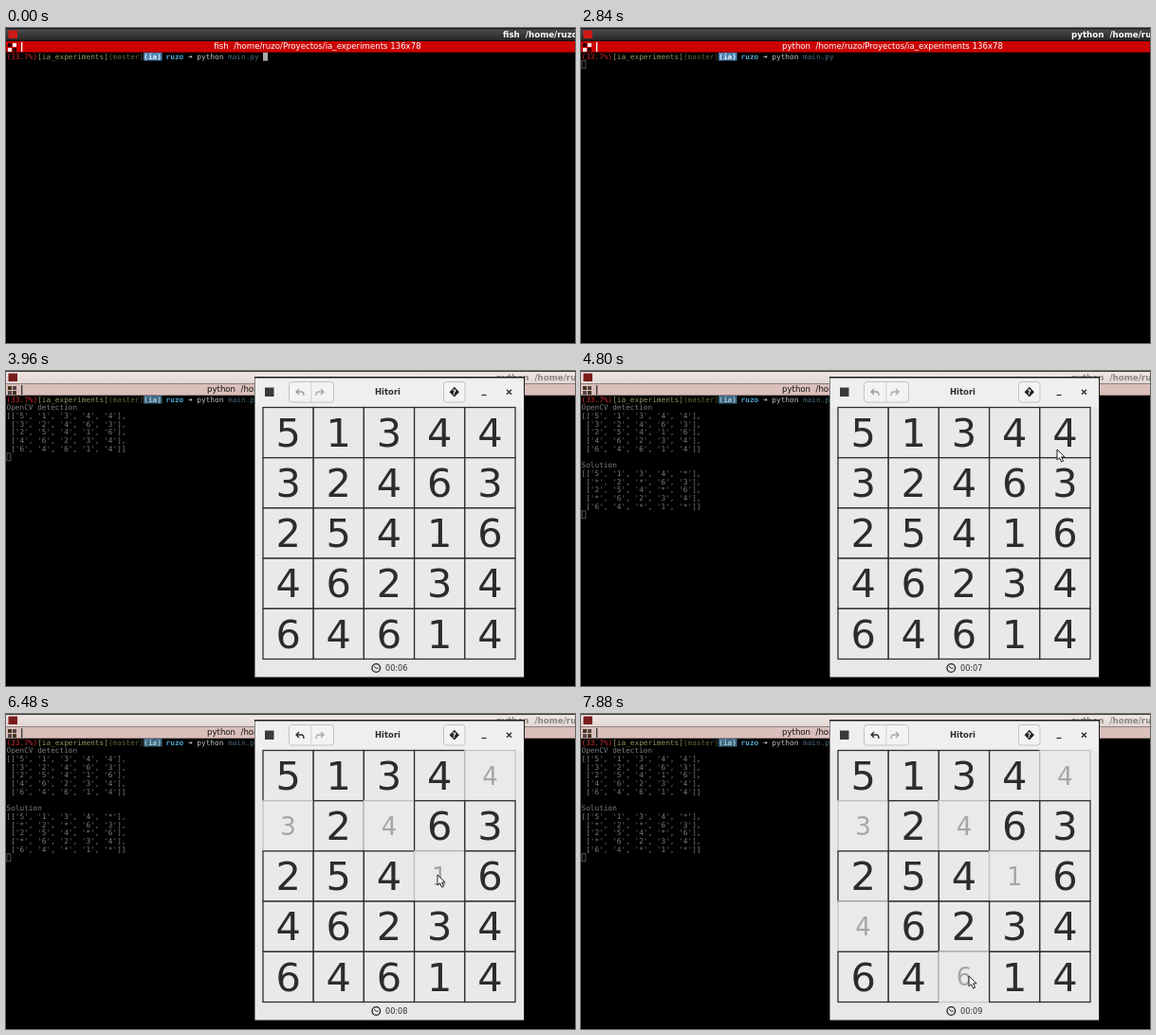
Recreate the animation shown at these times as an HTML page. Size 600 px wide and 333 px high, loop 8000 ms.

```html
<!DOCTYPE html>
<html>
<head>
<meta charset="utf-8">
<style>
html, body { margin: 0; height: 100%; overflow: hidden; background: #000; }
svg { display: block; width: 100vw; height: 100vh; }
text { white-space: pre; font-family: "DejaVu Sans", sans-serif; }
.mono { font-family: "DejaVu Sans Mono", monospace; font-size: 7.76px; }
</style>
</head>
<body>
<svg id="stage" viewBox="0 0 600 333">
  <defs>
    <linearGradient id="dark" x2="0" y2="1">
      <stop offset="0" stop-color="#1c1c1c"/><stop offset=".15" stop-color="#4a4a4a"/><stop offset="1" stop-color="#222"/>
    </linearGradient>
    <linearGradient id="light" x2="0" y2="1">
      <stop offset="0" stop-color="#f1e9e6"/><stop offset="1" stop-color="#e0d5d1"/>
    </linearGradient>
  </defs>
  <g id="scene"></g>
</svg>
<script>
const LOOP = 8000, STEP = 280;
const RUN = 2840, OPEN = 3120, DETECTED = 3960, SOLVED = 4520, MOUSE = 4800;
const COL = 4.67, LINE = 8.7, CELL = 53.2, GX = 271, GY = 38.5;
const GRID = ['51344', '32463', '25416', '46234', '64614'];
const SOLUTION = ['5134*', '*2*63', '254*6', '*6234', '64*1*'];
// row + column of each crossed-out cell, and when it is clicked
const CLICKS = { '04': 5080, '10': 6200, '12': 6480, '23': 6480, '30': 7600, '42': 7880 };
const PATH = [[502, 83], [474, 72], [449, 80], [353, 104], [301, 117], [394, 118],
  [455, 170], [420, 185], [330, 215], [300, 225], [352, 252], [409, 277]];

const scene = document.getElementById('scene');

const rect = (x, y, w, h, fill, more = '') =>
  `<rect x="${x}" y="${y}" width="${w}" height="${h}" fill="${fill}" ${more}/>`;
const text = (x, y, s, fill, size, more = '') =>
  `<text x="${x}" y="${y}" fill="${fill}" font-size="${size}" ${more}>${s}</text>`;
const path = (d, stroke, width = 1, fill = 'none') =>
  `<path d="${d}" fill="${fill}" stroke="${stroke}" stroke-width="${width}"/>`;
const mid = 'text-anchor="middle" ';
const bold = 'font-weight="bold"';

const mono = (col, row, s, fill, more = '') =>
  text(0.5 + col * COL, 32.5 + row * LINE, s, fill, 7.76, 'class="mono" ' + more);

function bars(t) {
  const focus = t < OPEN;
  const job = t < RUN ? 'fish' : 'python';
  const ink = focus ? '#fff' : '#111';
  return rect(0, 0, 600, 14, focus ? 'url(#dark)' : 'url(#light)') +
    rect(0, 0, 600, 1, focus ? '#1a1a1a' : '#4a4442') +
    rect(0, 13, 600, 1, focus ? '#111' : '#8d7f7c') +
    rect(2.5, 2.5, 9.5, 8.5, focus ? '#d01818' : '#7a1c1c') +
    text(t < RUN ? 524 : 517, 9.7, job + '  /home/ruzo/Proyectos', focus ? '#fff' : '#8a8583', 8.7, bold) +
    rect(0, 14, 600, 11.7, focus ? '#cc0000' : '#dabfba') +
    rect(2, 16, 4, 4, focus ? '#300' : '#432') +
    rect(7, 16, 4, 4, focus ? '#fff' : '#544') +
    rect(2, 21, 4, 4, focus ? '#eee' : '#544') +
    rect(7, 21, 4, 4, focus ? '#300' : '#432') +
    rect(16, 15, 1.3, 10, focus ? '#fff' : '#333') +
    text(328.5, 22.4, job + '  /home/ruzo/Proyectos/ia_experiments 136x78', ink, 8.6, mid);
}

const listing = (row, title, rows) => mono(0, row, title, '#7c7c7c') +
  rows.map((r, i) => {
    const items = [...r].map(c => `'${c}'`).join(', ');
    return mono(0, row + 1 + i, (i ? ' [' : '[[') + items + (i < 4 ? '],' : ']]'), '#7c7c7c');
  }).join('');

function terminal(t) {
  let s = rect(145, 26, 19.5, 8.5, t < OPEN ? '#4a80b0' : '#3c6680') +
    mono(0, 0, '(33.7%)', '#d02a2a') +
    mono(7, 0, '[ia_experiments]', '#94945e') +
    mono(23, 0, '(master)', '#5e6238') +
    mono(31, 0, '(ia)', t < OPEN ? '#e8f2fa' : '#a8c4d0', bold) +
    mono(36, 0, 'ruzo', '#4fa6d0', bold) +
    mono(41, 0, '➜', '#ccc') +
    mono(43, 0, 'python', '#c0c0c0') +
    mono(50, 0, 'main.py', '#456678');
  if (t < RUN) {
    const on = t < 570 || (t >= 1420 && t < 2270);
    return s + (on ? rect(271, 26, 5, 8.7, '#aaa') : '');
  }
  if (t >= DETECTED) s += listing(1, 'OpenCV detection', GRID);
  if (t >= SOLVED) s += listing(8, 'Solution', SOLUTION);
  const row = t >= SOLVED ? 14 : t >= DETECTED ? 7 : 1;
  return s + rect(0.9, 26 + row * LINE, 4, 8, 'none', 'stroke="#666" stroke-width=".8"');
}

function header(t) {
  const undo = t >= CLICKS['04'] ? '#2b2b2b' : '#999';
  const box = 'rx="3" stroke="#c4c2c4"';
  return rect(263, 8, 282.5, 30.5, '#f0eff0') +
    rect(273, 17.5, 9.5, 9.5, '#3a3a3a') +
    rect(298.5, 11.5, 47, 21.5, '#f4f3f4', box) +
    path('M321.8 11.5V33', '#d0ced0') +
    path('M309 19l-3 3 3 3M306 22h5.5q2.5 0 2.5 4', undo, 1.3) +
    path('M332 19l3 3-3 3M335 22h-5.5q-2.5 0-2.5 4', '#a8a8a8', 1.3) +
    text(402.5, 25.3, 'Hitori', '#2d2d2d', 8.5, mid + bold) +
    rect(461.5, 11.5, 22.5, 21.5, '#f4f3f4', box) +
    path('M472.8 16.8l5.2 5.4-5.2 5.4-5.2-5.4z', 'none', 0, '#222') +
    text(472.8, 25, '?', '#fff', 7.5, mid + bold) +
    path('M501.5 25.5h5', '#333', 1.3) +
    path('M528 19.8l5 5m0-5l-5 5', '#333', 1.5);
}

function board(t) {
  let s = '';
  GRID.forEach((line, r) => [...line].forEach((digit, c) => {
    const x = GX + c * CELL, y = GY + r * CELL;
    const out = t >= CLICKS['' + r + c];
    s += rect(x, y, CELL, CELL, out ? '#ebeaeb' : '#eae8ea',
        `stroke="${out ? '#c4c4c4' : '#2e2e2e'}" stroke-width="1.3"`) +
      text(x + CELL / 2, y + CELL / 2 + (out ? 9.4 : 14.6), digit, out ? '#a6a6a6' : '#2c2c2c', out ? 26 : 41.5, mid);
  }));
  return s;
}

function dialog(t) {
  const secs = 5 + Math.floor((t - 2000) / 1400);
  return rect(262, 6, 285, 318.5, '#1c1c1c') +
    rect(262.5, 7.5, 283.5, 316, '#e9e7e9') +
    header(t) + board(t) +
    `<circle cx="390.3" cy="314" r="4.3" fill="none" stroke="#222" stroke-width="1.3"/>` +
    path('M388 312l2.3 2.2h2.3', '#222') +
    text(400, 317, '00:0' + secs, '#2d2d2d', 8.1);
}

function pointer(t) {
  const [x, y] = PATH[Math.min(PATH.length - 1, Math.floor((t - MOUSE) / STEP))];
  return path(`M${x} ${y}v11l2.6-2.3 2 4.4 2-.9-2-4.3h3.6z`, '#222', 1, '#fff');
}

function render(t) {
  let s = bars(t) + terminal(t);
  if (t >= OPEN) s += dialog(t);
  if (t >= MOUSE) s += pointer(t);
  return s;
}

let last = '';
function tick(now) {
  const s = render(now % LOOP);
  if (s !== last) scene.innerHTML = last = s;
  requestAnimationFrame(tick);
}
tick(0);
</script>
</body>
</html>
```
